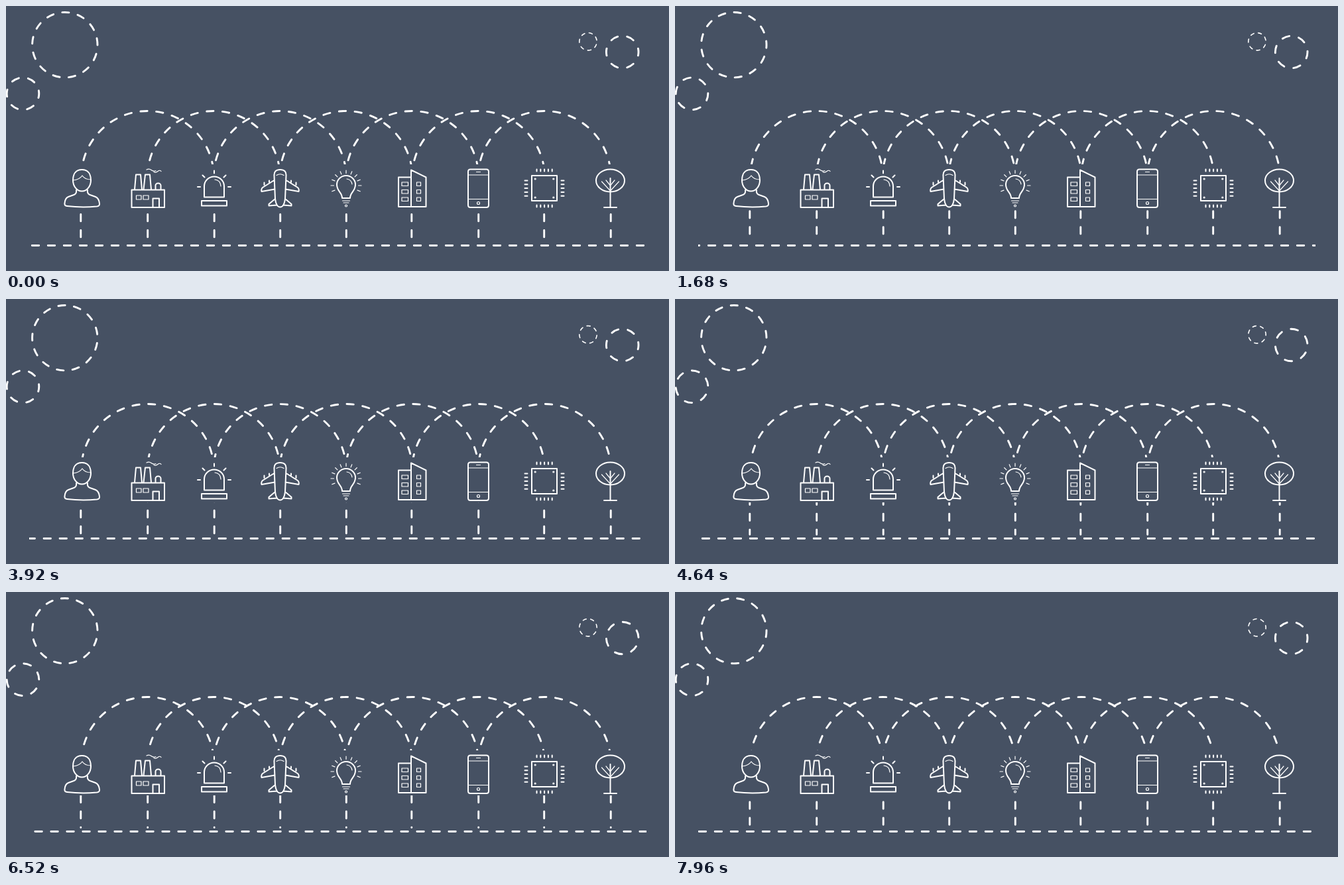
Animation of 1000 by 400 pixels, one loop 8000 ms. Source, as an HTML page:

```html
<!DOCTYPE html>
<html lang="en">
<head>
<meta charset="utf-8">
<style>
  html, body { margin: 0; width: 100%; height: 100%; overflow: hidden; background: #465163; }
  svg { display: block; }
  svg * { fill: none; stroke: #fff; }
  #icons { stroke-linecap: round; stroke-linejoin: round; }
  #icons path { stroke-width: 2; }
  #icons .thin { stroke-width: 1.2; }
  #lines * { stroke-width: 2.9; stroke-linecap: round; stroke-dasharray: 10.4 13.6; }
</style>
</head>
<body>
<svg width="1000" height="400" viewBox="0 0 1000 400">
  <clipPath id="windows">
    <path d="M0 0H1000V239H0Z M0 307H1000V357H0Z M35 357H966V400H35Z"/>
  </clipPath>
  <g id="lines" clip-path="url(#windows)"></g>
  <g id="icons">
    <!-- person -->
    <path d="M114.500 247C105 247 101 254 101 263C101 272 107 279.500 114.500 279.500S128 272 128 263C128 254 124 247 114.500 247Z
      M106 278Q107 284 101 285.500L94 288Q89 290 88.500 298Q88 301.500 92 302Q114 304.500 137 302.500Q141.500 302 141 298Q140 290 135 288L128 285.500Q122 284 123 278"/>
    <path class="thin" d="M101.500 263Q111 262 115 256Q119 262 128 262"/>
    <!-- factory -->
    <path d="M189.500 277.500H239V304H189.500Z M194 277L196 254.500H203L205 277 M207.500 277L210 254.500H217L219 277
      M225.500 277V271a4 3.500 0 0 1 8 0V277 M221.500 304V290.500H231V304"/>
    <path class="thin" d="M196.500 286H204V292H196.500Z M207 286H215V292H207Z
      M212 247Q216 245 219 247.500T226 248.500 M223 250.500Q226 252 229 249.500T234 249.500"/>
    <!-- siren -->
    <path d="M299 288.500V272a15 14.500 0 0 1 30 0V288.500Z M295 294H333V301.500H295Z
      M314 248.500V252.500 M296.500 255.500L299.500 258.500 M331.500 255.500L328.500 258.500 M289 273H293 M335 273H339"/>
    <path class="thin" d="M315 262Q323.500 263 324 272"/>
    <!-- plane -->
    <path d="M404.500 256Q404 247 413.500 247T422.500 256L421 291Q419.500 303.500 413.500 303.500T406 291Z
      M404.500 263L387 274Q384.500 276 385.500 280L405.500 276.500 M422.500 263L440 274Q442.500 276 441.500 280L421.500 276.500
      M406 291L396.500 299V301.500L409 300.500 M421 291L430.500 299V301.500L418 300.500
      M389.500 270V266.500 M397 266V263.500 M437.500 270V266.500 M430 266V263.500"/>
    <path class="thin" d="M408 255.500Q413.500 252 419 255.500"/>
    <!-- bulb -->
    <path d="M507 290C507 281 499 280 499 269.500a14 13.500 0 0 1 28 0C527 280 519 281 519 290Z"/>
    <path class="thin" d="M514 261Q521 262 522 269 M507.500 294H518.500 M509 297H517 M511.500 301.500a1.500 1.500 0 1 0 3 0a1.500 1.500 0 1 0 -3 0"/>
    <path class="thin" id="rays"/>
    <!-- buildings -->
    <path d="M611 258.500H592V303H611 M611 303V247.500L633.500 258.500V303Z"/>
    <path class="thin" id="panes"/>
    <!-- phone -->
    <path d="M700.500 246.500H724.500Q728 246.500 728 250V300.500Q728 304 724.500 304H700.500Q697 304 697 300.500V250Q697 246.500 700.500 246.500Z"/>
    <path class="thin" d="M709.500 250.500H715.500 M697 255H728 M697 291.500H728 M710.500 297.500a2 2 0 1 0 4 0a2 2 0 1 0 -4 0"/>
    <!-- chip -->
    <path d="M793 256H831V294H793Z"/>
    <path id="pins"/>
    <path class="thin" id="dots"/>
    <!-- tree -->
    <path d="M890 263.500a21.500 17 0 1 0 43 0a21.500 17 0 1 0 -43 0 M911.500 260V303.500 M902 304H921"/>
    <path class="thin" d="M911.500 279L924.500 265 M911.500 279L898.500 265 M911.500 271L918 263 M911.500 271L905 263"/>
  </g>
</svg>
<script>
const PERIOD = 24, STEP = 40, LOOP = 8000;
const lines = document.getElementById('lines');
const dashed = [];

// speed: units per second along the shape
function add(tag, attrs, phase, speed) {
  const el = document.createElementNS('http://www.w3.org/2000/svg', tag);
  for (const name in attrs) el.setAttribute(name, attrs[name]);
  lines.append(el);
  dashed.push({ el, phase, speed });
  return el;
}

// One counterclockwise turn takes 12 s
function ring(cx, cy, r, count, phase) {
  const length = count * PERIOD;
  return add('circle', { cx, cy, r, pathLength: length }, phase, -length / 12);
}

ring(88.8, 58.7, 49.2, 13, 13.9);
ring(25.5, 132.3, 24.3, 6, -4.4);
ring(929.7, 69.5, 24.3, 6, -5.2);
ring(878, 53.7, 13.2, 7, 9).style.strokeWidth = 1.6;

for (let i = 0; i < 7; i++)
  add('path', { d: `M${113.5 + i * 99.8} 258.5a100 100 0 0 1 200 0` }, 2.1, 52);
for (const x of [112.8, 213.7, 314.2, 413.7, 513.3, 611.8, 712.7, 811.7, 912.2])
  add('path', { d: `M${x} 288V355.5` }, 2.5, -60);
add('path', { d: 'M0 361.5H1000' }, 15.3, 78);

// Repeated icon details
const fill = (id, parts) => document.getElementById(id).setAttribute('d', parts.join(''));
const five = [0, 1, 2, 3, 4];
fill('rays', [...Array(11).keys()].map(i => {
  const a = Math.PI * (1 + (i - 1) / 8), c = Math.cos(a), s = Math.sin(a);
  return `M${513 + 18.5 * c} ${271 + 18.5 * s}L${513 + 23 * c} ${271 + 23 * s}`;
}));
fill('panes', [266, 277.5, 289].map(y => `M597 ${y}h9.500v5.500h-9.500ZM619.500 ${y}h6v5.500h-6Z`));
fill('pins', five.map(i => {
  const x = 800.5 + i * 5.8, y = 263.5 + i * 5.8;
  return `M${x} 246.500v3M${x} 300.500v3M782.500 ${y}h4M837.500 ${y}h4`;
}));
fill('dots', [261, 289].flatMap(y => [797.2, 824.8].map(x => `M${x} ${y}a1 1 0 1 0 2 0a1 1 0 1 0 -2 0`)));

function draw(now) {
  const t = Math.floor(now % LOOP / STEP) * STEP / 1000;
  for (const { el, phase, speed } of dashed)
    el.style.strokeDashoffset = -((phase + speed * t) % PERIOD);
  requestAnimationFrame(() => draw(performance.now()));
}
draw(performance.now());
</script>
</body>
</html>
```
